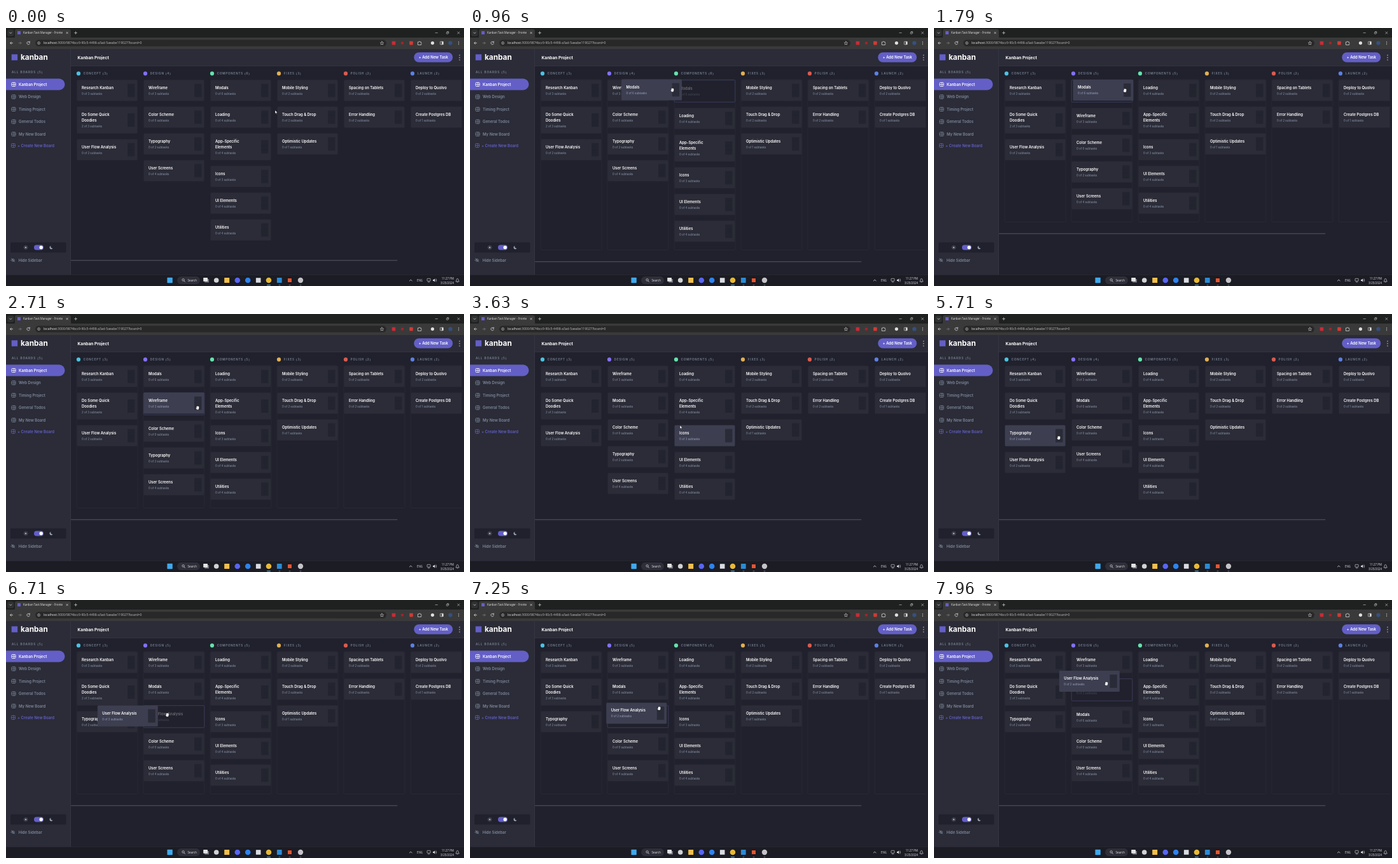
Recreate the animation shown at these times as an HTML page. Size 720 by 405 pixels, loop 8 s.

```html
<!DOCTYPE html>
<html lang="en">
<head>
<meta charset="utf-8">
<title>Kanban board</title>
<style>
html, body { margin: 0; width: 100%; height: 100%; overflow: hidden; background: #20212c; }
svg { display: block; width: 100vw; height: 100vh; font-family: Inter, sans-serif; }
text { white-space: pre; }
.ui { font-family: "Open Sans", sans-serif; }
</style>
</head>
<body>
<svg id="stage" viewBox="0 0 720 405"></svg>
<script>
const LOOP = 8000, LAG = 50;
const BG = '#20212c', PANEL = '#2b2c37', LINE = '#3a3b49', MUTED = '#7d889c', ACCENT = '#635fc7', HOVER = '#3d3e50';
const CARD = { w: 95, h: 33, line: 9, gap: 9, top: 81.5 };

const rect = (x, y, w, h, fill, r = 0, extra = '') =>
  `<rect x="${x}" y="${y}" width="${w}" height="${h}" rx="${r}" fill="${fill}" ${extra}/>`;
const dot = (x, y, r, fill) => `<circle cx="${x}" cy="${y}" r="${r}" fill="${fill}"/>`;
const text = (x, y, str, size, fill, weight = 600, extra = '') =>
  `<text x="${x}" y="${y}" font-size="${size}" fill="${fill}" font-weight="${weight}" ${extra}>${str}</text>`;
const stroke = (d, color, w = 0.8, extra = '') =>
  `<path d="${d}" fill="none" stroke="${color}" stroke-width="${w}" stroke-linecap="round" stroke-linejoin="round" ${extra}/>`;

// ---- board data ----
const columns = [
  ['CONCEPT', '#49c4e5', ['Research Kanban', 'Do Some Quick|Doodies', 'User Flow Analysis']],
  ['DESIGN', '#8471f2', ['Wireframe', 'Color Scheme', 'Typography', 'User Screens']],
  ['COMPONENTS', '#67e2ae', ['Modals', 'Loading', 'App-Specific|Elements', 'Icons', 'UI Elements', 'Utilities']],
  ['FIXES', '#e2b052', ['Mobile Styling', 'Touch Drag &amp; Drop', 'Optimistic Updates']],
  ['POLISH', '#d95c50', ['Spacing on Tablets', 'Error Handling']],
  ['LAUNCH', '#5c80e4', ['Deploy to Quolvo', 'Create Postgres DB']]
];
const subtasks = {
  'Research Kanban': '0 of 3', 'Do Some Quick|Doodies': '2 of 3', 'Wireframe': '0 of 3', 'Color Scheme': '0 of 0',
  'User Screens': '0 of 4', 'Modals': '0 of 6', 'Loading': '0 of 4', 'App-Specific|Elements': '0 of 4',
  'Icons': '0 of 3', 'UI Elements': '0 of 4', 'Utilities': '0 of 4', 'Optimistic Updates': '0 of 1',
  'Create Postgres DB': '0 of 1'
};

// [time, card] grabs, [time, card, column, index] moves, [time] drops
const steps = [
  [620, 'Modals'], [1050, 'Modals', 1, 0], [1850],
  [2620, 'Wireframe'], [2890, 'Wireframe', 1, 0], [3360],
  [5100, 'Typography'], [5270, 'Typography', 0, 2], [5680],
  [6170, 'User Flow Analysis'], [6650, 'User Flow Analysis', 1, 2], [7330, 'User Flow Analysis', 1, 1]
];

// cursor path: time, x, y
const path = [
  [0, 423, 129], [40, 423, 129], [480, 403, 98], [640, 403, 98], [850, 322, 97], [960, 318, 97], [1200, 300, 97],
  [1900, 300, 98], [2300, 301, 147], [2760, 301, 147], [3000, 300, 103], [3360, 300, 104], [3630, 330, 174.8],
  [3800, 334, 182], [4150, 330, 190], [4500, 303, 227], [5110, 303, 227], [5350, 205, 196], [5700, 196, 194],
  [6000, 195, 232], [6200, 195, 232], [6480, 196, 190], [6660, 227, 181], [6710, 253, 180], [6850, 297, 182],
  [7150, 298, 180], [7450, 294, 138], [7850, 292, 121], [7910, 280.5, 126.5], [7960, 271, 131], [8000, 265, 133]
];

function slope(i, k) {
  if (i < 1 || i >= path.length - 1) return 0;
  const d = j => (path[j + 1][k] - path[j][k]) / (path[j + 1][0] - path[j][0]);
  const a = d(i - 1), b = d(i);
  return a * b <= 0 ? 0 : 2 * a * b / (a + b);
}

function cursorAt(t) {
  let i = 0;
  while (i < path.length - 2 && path[i + 1][0] <= t) i++;
  const span = path[i + 1][0] - path[i][0];
  const u = Math.max(0, Math.min(1, (t - path[i][0]) / span));
  return [1, 2].map(k => {
    const a = path[i][k], b = path[i + 1][k];
    const e = u * u * (3 - 2 * u);
    return a + (b - a) * e + span * u * (1 - u) * ((1 - u) * slope(i, k) - u * slope(i + 1, k));
  });
}

const heightOf = name => CARD.h + (name.includes('|') ? CARD.line : 0);
const columnX = i => 111.5 + 105 * i;

function layout(lists, held) {
  const cards = [];
  let bottom = 0;
  lists.forEach((list, c) => {
    let y = CARD.top;
    for (const name of list) {
      const h = heightOf(name) + (name === held ? 2 : 0);
      cards.push({ name, x: columnX(c), y, h });
      bottom = Math.max(bottom, y + h);
      y += h + CARD.gap;
    }
  });
  return { cards, bottom };
}

function boardAt(t) {
  const lists = columns.map(c => [...c[2]]);
  let held = null, grip = null, since = 0;
  for (const [time, name, col, index] of steps) {
    if (time > t) break;
    if (!name) { held = null; continue; }
    if (name !== held) {
      const card = layout(lists).cards.find(c => c.name === name);
      const [x, y] = cursorAt(time);
      grip = [x - card.x, y - card.y];
      held = name;
      since = time;
    }
    if (col !== undefined) {
      const from = lists.find(l => l.includes(name));
      from.splice(from.indexOf(name), 1);
      lists[col].splice(index, 0, name);
    }
  }
  return { lists, held, grip, since };
}

// ---- drawing ----
function cardFace(x, y, name, lit) {
  const h = heightOf(name), lines = name.split('|');
  const hy = y + (h - 21) / 2;
  return lines.map((s, i) => text(x + 7.5, y + 14.1 + 9.2 * i, s, 5.9, '#fff')).join('') +
    text(x + 7.5, y + h - 9.8, (subtasks[name] || '0 of 2') + ' subtasks', 4.4, lit ? '#8a95ad' : MUTED, 500) +
    rect(x + 79.5, hy, 11.5, 21, lit ? '#2b2c39' : '#23242f', 0.8) +
    rect(x + 80.5, hy + 1, 9.5, 19, 'url(#grip)');
}

const solidCard = (x, y, name, lit) =>
  rect(x, y, CARD.w, heightOf(name), lit ? HOVER : PANEL, 1.5) + cardFace(x, y, name, lit);

const slot = c =>
  rect(c.x - 0.3, c.y + 0.2, CARD.w + 0.6, c.h - 0.4, BG, 1.5, 'stroke="#46456f" stroke-width=".7"') +
  `<g opacity=".33">${cardFace(c.x, c.y + 1, c.name)}</g>`;

const arrow = (x, y) =>
  `<path transform="translate(${x} ${y})" d="M0 0V5.4L1.3 4.2L2.2 6.2L3 5.8L2.2 3.9H3.9Z" fill="#fff" stroke="#000" stroke-width=".4"/>`;
const hand = (x, y) =>
  `<path transform="translate(${x} ${y})" d="M-1.7 .6V-1.7Q-1.2 -2.7 -.6 -2.2Q0 -3.2 .6 -2.3Q1.3 -2.9 1.7 -2Q2.6 -2.2 2.6 -1.2V1L1.7 3.2H-1.1L-2.8 .8Q-2.8 -.3 -1.7 .6Z" fill="#fff" stroke="#000" stroke-width=".4"/>`;

function drawBoard(t) {
  const { lists, held, grip, since } = boardAt(t);
  const { cards, bottom } = layout(lists, held);
  const [cx, cy] = cursorAt(t);
  let out = '', overGrip = false;

  lists.forEach((list, i) => {
    const [name, color] = columns[i];
    out += dot(114 + 105 * i, 71.4, 3.1, color) +
      text(121.8 + 105 * i, 73, `${name} (${list.length})`, 4.5, MUTED, 600, 'letter-spacing=".85"');
    if (held) out += rect(columnX(i) - 0.5, 81, 96, bottom + 13 - 81, 'none', 1.5, 'stroke="#2b2c38" stroke-width=".7"');
  });
  for (const c of cards) {
    const over = !held && cx > c.x && cx < c.x + CARD.w && cy > c.y && cy < c.y + c.h;
    if (over && cx > c.x + 79) overGrip = true;
    out += c.name === held ? slot(c) : solidCard(c.x, c.y, c.name, over);
  }
  out += rect(102, bottom + 30.4, 513.5, 1.6, '#444552', 0.8);
  if (held) {
    const [gx, gy] = cursorAt(Math.max(since, t - LAG));
    out += solidCard(gx - grip[0], gy - grip[1], held, true);
  }
  board.innerHTML = out;
  pointer.innerHTML = held || overGrip ? hand(cx, cy) : arrow(cx, cy);
}

// ---- fixed surroundings ----
function boardIcon(x, y, color) {
  return rect(x, y, 6, 6, 'none', 1, `stroke="${color}" stroke-width=".8"`) +
    stroke(`M${x + 3.4} ${y}v6M${x} ${y + 3}h6`, color, 0.7);
}

function browser() {
  const ink = '#d4d4d4';
  return rect(0, 0, 720, 16, '#1f2020') + rect(0, 15, 720, 18, '#3a3a3b') +
    rect(2, 2.5, 10.5, 10.5, '#303132', 3) + stroke('M5.7 7l1.6 1.6l1.6 -1.6', ink) +
    `<path d="M12 15.5Q14 15.5 14 13V5Q14 2 17 2H99Q102 2 102 5V13Q102 15.5 104 15.5Z" fill="#3a3a3b"/>` +
    rect(18, 5, 5, 5, ACCENT) + text(27, 9.2, 'Kanban Task Manager - Fronte', 4.4, '#e3e3e3', 400, 'class="ui"') +
    stroke('M94.8 6.3l2.6 2.6m0 -2.6l-2.6 2.6M107.6 7.6h4m-2 -2v4', ink, 0.7) +
    stroke('M675 7.6h3.4M709.8 6l3.2 3.2m0 -3.2l-3.2 3.2', ink, 0.6) +
    rect(692.4, 6.6, 2.6, 2.6, 'none', 0.4, `stroke="${ink}" stroke-width=".6"`) + stroke('M693.6 5.7h2.3v2.3', ink, 0.6) +
    stroke('M10.6 23.6h-4m1.8 -1.8l-1.8 1.8l1.8 1.8', ink) + stroke('M20 23.6h4m-1.8 -1.8l1.8 1.8l-1.8 1.8', '#77787a') +
    stroke('M37 22.2a2.3 2.3 0 1 0 .4 1.9M37.3 21v1.5h-1.5', ink) +
    rect(46, 18.4, 552, 10.4, '#282829', 5.2) +
    `<circle cx="51.6" cy="23.6" r="2" fill="none" stroke="${ink}" stroke-width=".6"/>` + stroke('M51.6 23.4v1.2M51.6 22.5v.1', ink, 0.5) +
    `<text class="ui" x="59" y="25.4" font-size="5.03" fill="#c0c1c4"><tspan fill="#f0f0f0">localhost</tspan>:3000/9874bcc9-90c5-4498-a3ad-5aeabe119027?board=0</text>` +
    stroke('M591 21.1l.8 1.7l1.9 .2l-1.4 1.3l.4 1.9l-1.7 -1l-1.7 1l.4 -1.9l-1.4 -1.3l1.9 -.2z', ink, 0.6) +
    rect(606.7, 20.8, 5.6, 5.6, '#c92b35', 0.8) + dot(623, 23.6, 2.2, '#a3242c') + rect(634.2, 20.8, 5.6, 5.6, '#d23a35', 0.8) +
    stroke('M647.8 22h1.4a.9 .9 0 0 1 1.8 0h1.6v1.5a.9 .9 0 0 1 0 1.7v1.3h-4.8z', ink) +
    dot(670.5, 23.6, 2.6, '#dedede') + rect(682.6, 21.3, 4.8, 4.6, 'none', 0.5, `stroke="${ink}" stroke-width=".7"`) +
    rect(685, 21.3, 2.4, 4.6, ink) + dot(698.5, 23.6, 3.2, '#36507c') +
    [21.6, 23.6, 25.6].map(y => dot(711.6, y, 0.6, ink)).join('');
}

function sidebar() {
  const names = ['Kanban Project', 'Web Design', 'Timing Project', 'General Todos', 'My New Board'];
  return rect(0, 33, 102, 355, PANEL) + rect(101.3, 33, 0.7, 355, LINE) +
    rect(8.7, 41.3, 9.4, 9.4, ACCENT) + text(23, 50.3, 'kanban', 11.8, '#fff', 700) +
    text(9, 71.3, 'ALL BOARDS (5)', 4.5, MUTED, 600, 'letter-spacing="1"') +
    `<path d="M0 79.5H83.5a9 9 0 0 1 0 18H0Z" fill="${ACCENT}"/>` +
    names.map((s, i) => {
      const y = 88.5 + 19.5 * i, color = i ? MUTED : '#fff';
      return boardIcon(9, y - 3, color) + text(20, y + 2.2, s, 6, color);
    }).join('') +
    boardIcon(8.4, 181.4, ACCENT) + text(18, 186.6, '+ Create New Board', 6, ACCENT) +
    rect(7, 336.5, 87.5, 16, BG, 1.5) +
    dot(31, 344.5, 1.5, '#98a2b5') +
    stroke('M31 341.6v.1M31 347.3v.1M28.1 344.5h.1M33.8 344.5h.1M29 342.5h.1M33 342.5h.1M29 346.5h.1M33 346.5h.1', '#98a2b5') +
    rect(44, 340.6, 15, 7.8, ACCENT, 3.9) + dot(55.2, 344.5, 2.7, '#fff') +
    `<path d="M70.6 341.9a2.7 2.7 0 1 0 3 3.8a2.6 2.6 0 0 1 -3 -3.8Z" fill="#98a2b5"/>` +
    stroke('M8 364.5q3 -4 6 0q-3 4 -6 0M8.8 361.8l4.6 5.2', MUTED, 0.8) + dot(11, 364.5, 1, MUTED) +
    text(19.7, 366.7, 'Hide Sidebar', 6, MUTED);
}

function header() {
  return rect(102, 33, 618, 26.5, PANEL) + rect(102, 59.2, 618, 0.7, LINE) +
    text(112.6, 48.6, 'Kanban Project', 6.6, '#fff', 700) +
    rect(641.3, 38.3, 61, 15.4, ACCENT, 7.7) + text(671.8, 48.2, '+ Add New Task', 5.9, '#fff', 600, 'text-anchor="middle"') +
    [42.7, 46.4, 50.1].map(y => dot(713, y, 0.9, '#8f9ab0')).join('');
}

function taskbar() {
  const ink = '#e4e4e6', y = 396;
  const disc = (x, r, c) => dot(x, y, r, c);
  const tile = (x, s, c) => rect(x - s / 2, y - s / 2, s, s, c, 0.6);
  return rect(0, 387.6, 720, 17.4, '#1b1c24') + rect(0, 387.4, 720, 0.5, '#2c2d36') +
    tile(257.6, 8.4, '#3fa9ec') +
    rect(269, 390, 36, 12, '#2e2f39', 6) + `<circle cx="278.6" cy="395.4" r="1.7" fill="none" stroke="${ink}" stroke-width=".7"/>` +
    stroke('M279.9 396.8l1.4 1.5', ink) + text(285.6, 397.9, 'Search', 4.6, ink, 400, 'class="ui"') +
    rect(312.2, 394, 6.8, 5.6, '#75767e', 0.5) + rect(310.2, 392, 6.8, 5.8, ink, 0.5) +
    disc(330.7, 3.8, '#d2d3d4') + tile(347.2, 8, '#f2c04c') + disc(363.8, 4.3, '#5865f2') + disc(380.2, 4.3, '#2d83f0') +
    tile(396.7, 7.6, '#d9dce2') + disc(413, 4.3, '#e9b834') + tile(429.8, 7.8, '#2b8bd6') + tile(446, 6, '#e8552f') +
    disc(463, 4.2, '#c4c4c8') +
    rect(410, 402.9, 6, 1, '#5bb5ee', 0.5) + [430, 446, 463].map(x => rect(x - 1.3, 402.9, 2.6, 0.9, '#86878d', 0.4)).join('') +
    stroke('M634.4 397l1.9 -1.9l1.9 1.9', ink) + text(646, 397.8, 'ENG', 4.4, ink, 400, 'class="ui"') +
    rect(662, 393.3, 5.2, 3.9, 'none', 0.5, `stroke="${ink}" stroke-width=".6"`) + stroke('M663.4 398.8h2.6', ink, 0.6) +
    `<path d="M671.2 395h1.2l1.6 -1.5v5l-1.6 -1.5h-1.2z" fill="${ink}"/>` + stroke('M675 394.6q1 1.4 0 2.8M676.1 393.7q1.7 2.3 0 4.6', ink, 0.5) +
    text(704, 394.8, '11:27 PM', 4.45, ink, 400, 'class="ui" text-anchor="end"') +
    text(704, 401.6, '3/25/2024', 4.45, ink, 400, 'class="ui" text-anchor="end"') +
    stroke('M707.3 397.7q.9 -.9 .9 -2.6q.2 -1.7 1.5 -1.7t1.5 1.7q0 1.7 .9 2.6zM709.1 398.9h1.2', ink, 0.6);
}

document.getElementById('stage').innerHTML =
  `<defs>
    <pattern id="grip" width="1.9" height="1.9" patternUnits="userSpaceOnUse"><circle cx=".95" cy=".95" r=".35" fill="#15161f"/></pattern>
    <clipPath id="view"><rect x="102" y="60" width="614.5" height="327"/></clipPath>
  </defs>` +
  rect(0, 0, 720, 405, BG) + '<g id="board" clip-path="url(#view)"></g>' +
  browser() + sidebar() + header() + taskbar() + '<g id="pointer"></g>';

const board = document.getElementById('board');
const pointer = document.getElementById('pointer');
const start = performance.now();

function tick() {
  drawBoard((performance.now() - start) % LOOP);
  requestAnimationFrame(tick);
}
tick();
</script>
</body>
</html>
```
